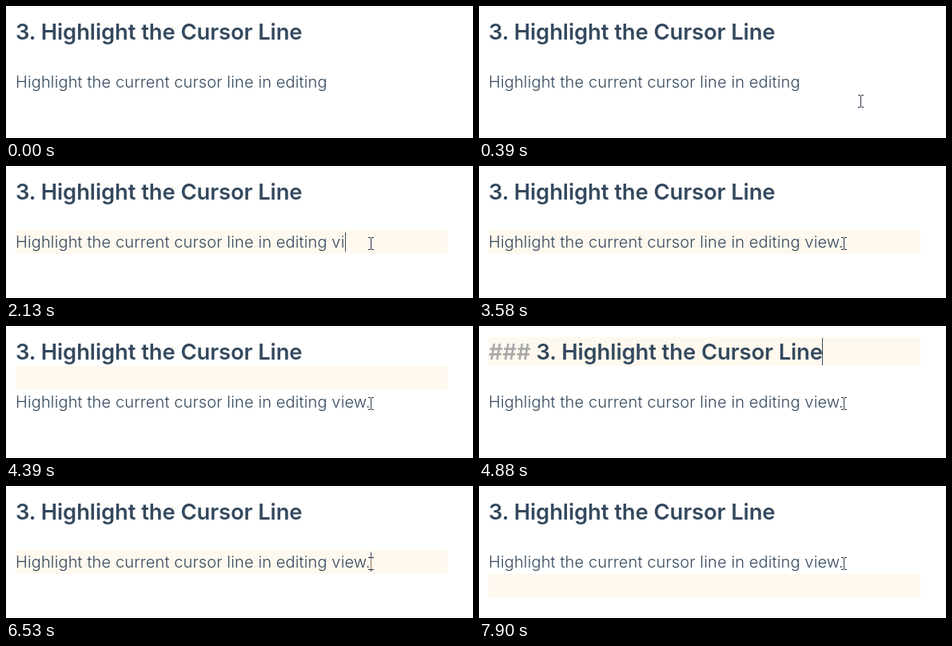
An HTML page for the animation above (8 s loop, 584 px wide and 165 px high).

```html
<!DOCTYPE html>
<html lang="en">
<head>
<meta charset="utf-8">
<title>Highlight the Cursor Line</title>
<style>
  html, body { margin: 0; width: 100%; height: 100%; overflow: hidden; background: #fff; }
  body { position: relative; color: #34495e; font-family: Inter, sans-serif; font-optical-sizing: none; }
  body > * { position: absolute; }
  .line { left: 12px; white-space: pre; }
  #heading { top: 14px; font-size: 27.4px; line-height: 36px; font-weight: 600; letter-spacing: -0.003em; }
  #marks { color: #aaa; }
  #text { top: 80px; font-size: 20px; line-height: 30px; font-weight: 300; letter-spacing: 0.007em; }
  #highlight { left: 12px; width: 540px; background: #fef8ee; }
  #caret { width: 1px; background: #34495e; }
  #pointer { left: 0; top: 0; fill: #d0c0b0; mix-blend-mode: difference; }
</style>
</head>
<body>
<div id="highlight"></div>
<div id="heading" class="line"><span id="marks">### </span>3. Highlight the Cursor Line</div>
<div id="text" class="line"></div>
<div id="caret"></div>
<svg id="pointer" width="7" height="16" shape-rendering="crispEdges">
  <path d="M0 0h3v1h-3zM4 0h3v1h-3zM3 1h1v14h-1zM0 15h3v1h-3zM4 15h3v1h-3z"/>
</svg>
<script>
const LOOP = 8000;
const $ = id => document.getElementById(id);
const [highlight, marks, text, caret, pointer] =
  ['highlight', 'marks', 'text', 'caret', 'pointer'].map($);

// Editor rows: highlight top and height, caret height
const rows = {
  heading: { top: 14, height: 36, caret: 34 },
  blank: { top: 50, height: 30, caret: 24 },
  body: { top: 80, height: 30, caret: 24 },
  next: { top: 110, height: 30, caret: 24 }
};

// Caret moves: start time, row, caret x, time at which it blinks off
const moves = [
  [960, 'body', 408, 1460],
  [1950, 'body', 408],
  [2040, 'body', 419],
  [2130, 'body', 424],
  [2380, 'body', 436],
  [2700, 'body', 452],
  [3080, 'body', 456, 3580],
  [3890, 'blank', 12, 4390],
  [4880, 'heading', 429, 5390],
  [5700, 'blank', 12, 6210],
  [6530, 'body', 456, 7090],
  [7340, 'next', 12, 7900]
];

const sentence = 'Highlight the current cursor line in editing ';
const typed = 'view.';
const keyTimes = [2040, 2130, 2380, 2700, 3080];

function place(el, x, y) {
  el.style.transform = `translate(${x}px, ${y}px)`;
}

function drawPointer(t) {
  const p = Math.min(1, Math.max(0, t / 830));
  const left = (1 - p) ** 2;
  place(pointer, Math.round(453 + 76 * left), Math.round(89 + 80 * left));
}

function drawEditor(t) {
  text.textContent = sentence + typed.slice(0, keyTimes.filter(k => t >= k).length);

  const move = moves.filter(m => t >= m[0]).pop();
  highlight.hidden = !move;
  caret.hidden = !move || t >= move[3];
  marks.hidden = !move || move[1] !== 'heading';
  if (!move) return;

  const row = rows[move[1]];
  highlight.style.top = row.top + 'px';
  highlight.style.height = row.height + 'px';
  caret.style.left = move[2] + 'px';
  caret.style.top = row.top + (row.height - row.caret) / 2 + 'px';
  caret.style.height = row.caret + 'px';
}

function frame() {
  const t = performance.now() % LOOP;
  drawPointer(t);
  drawEditor(t);
  requestAnimationFrame(frame);
}
frame();
</script>
</body>
</html>
```
